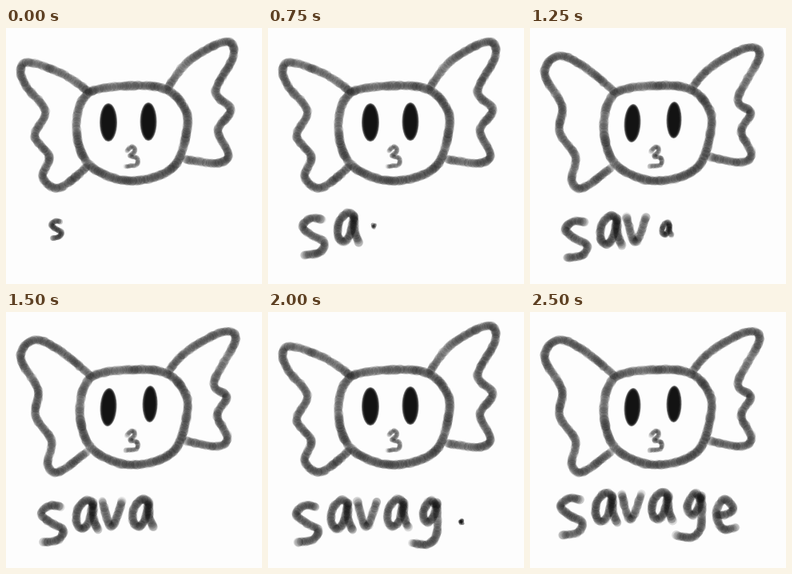
Animation, 320 px wide and 320 px high, one loop 10000 ms. Source, as an HTML page with a canvas:

```html
<!DOCTYPE html>
<html lang="en">
<head>
<meta charset="utf-8">
<title>savage</title>
<style>
html, body { margin: 0; width: 100%; height: 100%; overflow: hidden; background: #fdfdfd; }
canvas { display: block; width: 320px; height: 320px; }
</style>
</head>
<body>
<canvas id="stage" width="320" height="320"></canvas>
<script>
const ctx = document.getElementById('stage').getContext('2d');
const LOOP = 10000, LAST = 30, TAU = Math.PI * 2;
const INK = '#0c0c0c', PAPER = '#fdfdfd';

let seed = 1;
function rand() {
  seed = (seed + 0x6D2B79F5) | 0;
  let n = Math.imul(seed ^ (seed >>> 15), 1 | seed);
  n = (n + Math.imul(n ^ (n >>> 7), 61 | n)) ^ n;
  return ((n ^ (n >>> 14)) >>> 0) / 4294967296;
}

const mix = (a, b, t) => a + (b - a) * t;
const pairs = flat => Array.from({ length: flat.length / 2 }, (_, i) => [flat[2 * i], flat[2 * i + 1]]);

// Catmull-Rom spline, visited once per pixel of length
function trace(pts, closed, visit) {
  const n = pts.length;
  const at = i => closed ? pts[(i + n) % n] : pts[Math.max(0, Math.min(n - 1, i))];
  let last = null;
  for (let i = 0; i < (closed ? n : n - 1); i++) {
    const [a, b, c, d] = [at(i - 1), at(i), at(i + 1), at(i + 2)];
    for (let t = 0; t < 1; t += .01) {
      const [x, y] = [0, 1].map(k => b[k] + t / 2 * (c[k] - a[k] +
        t * (2 * a[k] - 5 * b[k] + 4 * c[k] - d[k] +
        t * (3 * (b[k] - c[k]) + d[k] - a[k]))));
      if (last && Math.hypot(x - last[0], y - last[1]) < 1) continue;
      last = [x, y];
      visit(x, y);
    }
  }
}

// Soft charcoal: faint overlapping dabs, slightly jittered
function brush(pts, radius, flow = .62, closed = false) {
  ctx.fillStyle = INK;
  trace(pts, closed, (x, y) => {
    ctx.globalAlpha = flow / radius * mix(.7, 1.3, rand());
    ctx.beginPath();
    ctx.arc(x + rand() - .5, y + rand() - .5, radius * mix(.88, 1.1, rand()), 0, TAU);
    ctx.fill();
  });
  ctx.globalAlpha = 1;
}

function eye(x, y, rx, ry, tilt) {
  ctx.fillStyle = INK;
  ctx.globalAlpha = .5;
  for (let inset = 0; inset < 5; inset++) {
    ctx.beginPath();
    ctx.ellipse(x, y, rx - inset * .8, ry - inset * .8, tilt, 0, TAU);
    ctx.fill();
  }
  ctx.globalAlpha = 1;
}

const HEAD = pairs([104,81, 165,72, 200,77, 220,95, 227,122, 209,174, 155,191, 104,171, 88,124]);
const MOUTH = pairs([151,154, 158,148, 161,154, 155,160, 164,163, 163,171, 149,173]);
const WINGS = [
  [
    [104,80, 70,57, 28,43, 18,54, 26,74, 49,104, 36,135, 54,161, 46,186, 66,200, 101,174],
    [203,73, 230,40, 275,17, 284,36, 262,79, 281,102, 265,128, 278,158, 264,169, 224,164]
  ],
  [
    [105,79, 70,50, 40,35, 22,44, 20,63, 40,97, 37,130, 57,161, 52,190, 66,200, 101,175],
    [204,73, 225,50, 270,25, 287,35, 260,88, 276,106, 264,129, 277,158, 262,168, 225,161]
  ]
];

function creature(pose) {
  seed = 40 + pose;
  const squeeze = 1 - pose * .03;
  WINGS[pose].forEach(w => brush(pairs(w), 5.5));
  brush(HEAD.map(([x, y]) => [227 - (227 - x) * squeeze, y]), 5.8, .66, true);
  brush(MOUTH, 3, .42);
  eye(128, 118 + pose, 11 - pose * .6, 24, pose * .05);
  eye(178 + pose * 2, 117 - pose * 2, 10.5 - pose, 24 - pose, pose * .02);
}

// Letter strokes in a unit box
const GLYPHS = {
  s: [.85,.03, .4,0, .03,.22, .45,.47, .95,.65, .75,.92, .1,1],
  a: [.78,.1, .48,0, .1,.3, .05,.75, .3,.95, .6,.7, .78,.1, .8,.6, 1,1],
  v: [0,.03, .45,1, 1,0],
  g: [.92,.12, .7,0, .43,.3, .6,.5, .85,.34, .96,.06, .95,.75, .6,1, 0,.96],
  e: [.12,.52, .5,.5, .85,.3, .4,0, .05,.45, .35,.98, 1,.92]
};

// Centre and size of each letter at rest
const WORD = [
  ['s', 52, 256, 30, 46],
  ['a', 95, 245, 28, 38],
  ['v', 127, 243, 25, 33],
  ['a', 165, 243, 27, 36],
  ['g', 199, 254, 33, 55],
  ['e', 245, 253, 27, 38]
];

// Whole-word offset while writing: step, dx, dy
const DRIFT = [[0, 11, -4], [6, 4, 2], [12, 6, 8], [18, 6, 9], [24, -3, 9], [27, -6, 11], [30, 0, 0]];

function drift(step) {
  const i = Math.max(1, DRIFT.findIndex(k => k[0] >= step));
  const [a, b] = [DRIFT[i - 1], DRIFT[i]];
  const t = (step - a[0]) / (b[0] - a[0]);
  return [mix(a[1], b[1], t), mix(a[2], b[2], t)];
}

function word(step) {
  seed = 900 + step * 31;
  const [dx, dy] = drift(step);
  WORD.forEach(([name, cx, cy, w, h], i) => {
    const age = step - (5 * i - 1);
    if (age < 0) return;
    const size = 1 - Math.pow(1 - Math.min(1, (age + .3) / 4.3), 1.7);
    const pts = pairs(GLYPHS[name]).map(([u, v]) =>
      [cx + dx + (u - .5) * w * size, cy + dy + (v - .5) * h * size]);
    brush(pts, mix(1.8, 5.4, size));
  });
}

// Twelve steps a second on a 10 ms grid, then a long hold
function stepAt(t) {
  let k = 0;
  while (k < LAST && t >= 10 * Math.floor((k + 1) * 25 / 3)) k++;
  return k;
}

let shown = -1;
const begin = performance.now();
function tick() {
  const step = stepAt((performance.now() - begin) % LOOP);
  if (step !== shown) {
    shown = step;
    ctx.fillStyle = PAPER;
    ctx.fillRect(0, 0, 320, 320);
    creature(Math.floor(step / 2) % 2);
    word(step);
  }
  requestAnimationFrame(tick);
}
tick();
</script>
</body>
</html>
```
